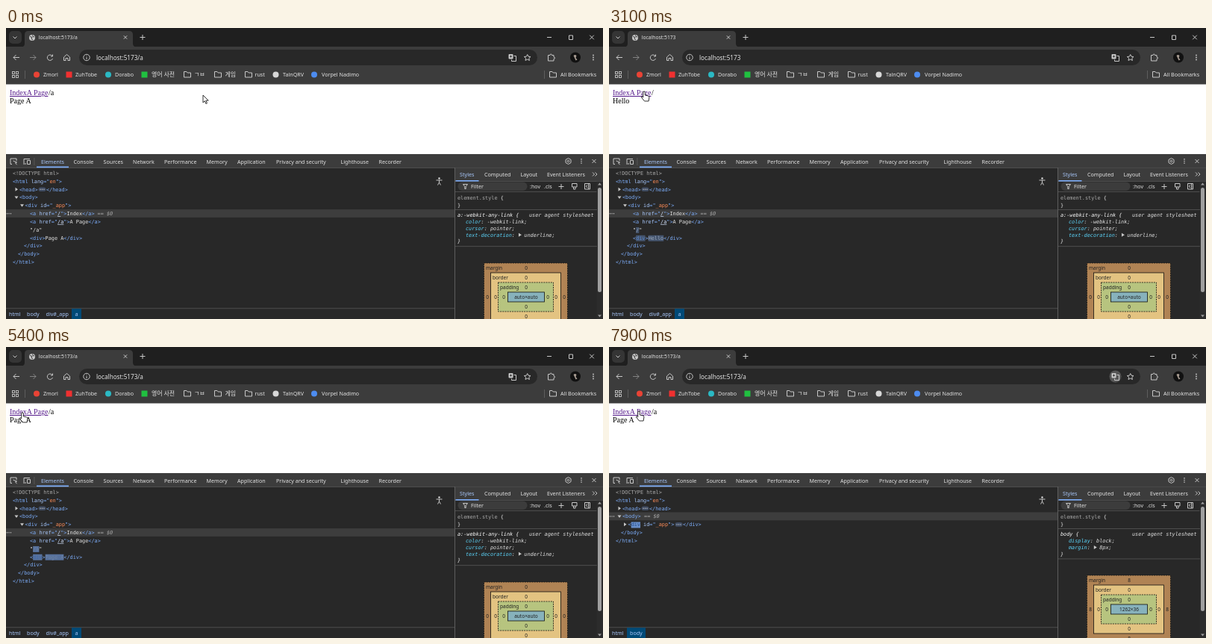
Recreate the animation shown at these times as an HTML page. Size 800x390 px, loop 8 s.

```html
<!DOCTYPE html>
<html lang="en">
<head>
<meta charset="utf-8">
<style>
html, body { margin: 0; width: 100%; height: 100%; overflow: hidden; background: #282828 }
svg { display: block; width: 800px; height: 390px }
text { white-space: pre; font: 7.15px "Noto Sans", "Open Sans", "Noto Sans CJK KR", sans-serif; fill: #e3e3e3 }
.ko { font-family: "Noto Sans CJK KR", "Noto Sans CJK", sans-serif; font-size: 8px }
.tool { font-weight: 500 }
.mono { font: 6.85px "DejaVu Sans Mono", monospace }
.it { font-style: italic }
.page { font: 10px "Liberation Serif", serif; fill: #000 }
.box { font-size: 6.5px; fill: #222; text-anchor: middle }
.tag { fill: #7cacf8 }
.name { fill: #a8c7fa }
.val { fill: #fe8d59 }
.url { fill: #d3e3fd }
.prop { fill: #5cd5fb }
.sel { fill: #fff }
.dim { fill: #ababab }
.link { text-decoration: underline }
.icon { fill: none; stroke: #c7c7c7; stroke-width: 1 }
</style>
</head>
<body>
<svg viewBox="0 0 800 390"><g id="frame"></g><g id="live"></g></svg>
<script>
const CHAR = 4.125, LOOP = 8000, RELOAD = 7700, FADE = 900;

// Moments when the route changes; it alternates between "/" and "/a".
const clicks = [700, 1050, 1500, 2000, 2500, 3300, 3650, 4000, 4700, 5000, 5600, 5900, 6300, 7100];

// Pointer tip: time, x, y
const path = [
  [0, 264, 90], [200, 264, 90], [600, 12, 86], [700, 12, 86], [950, 42, 86], [1050, 42, 86],
  [1400, 12, 86], [1500, 12, 86], [1700, 36, 86], [2000, 42, 86], [2400, 14, 86], [2500, 14, 86],
  [2800, 45, 86], [3100, 47, 85], [3300, 47, 85], [3550, 13, 86], [3650, 13, 86], [3900, 43, 86],
  [4000, 43, 86], [4400, 12, 86], [4700, 12, 86], [4900, 40, 86], [5000, 40, 86], [5400, 22, 88],
  [5600, 13, 86], [5800, 43, 86], [5900, 43, 86], [6200, 13, 86], [6300, 13, 86], [6600, 44, 86],
  [7100, 44, 86], [7900, 40, 86]
];

const esc = s => s.replace(/</g, '&lt;').replace(/>/g, '&gt;');
const rect = (x, y, w, h, fill, more = '') => `<rect x="${x}" y="${y}" width="${w}" height="${h}" fill="${fill}" ${more}/>`;
const circle = (x, y, r, fill, more = '') => `<circle cx="${x}" cy="${y}" r="${r}" fill="${fill}" ${more}/>`;
const raw = (x, y, s, cls = '', more = '') => `<text x="${x}" y="${y}" class="${cls}" ${more}>${s}</text>`;
const text = (x, y, s, cls, more) => raw(x, y, esc(s), cls, more);
const span = (cls, s) => `<tspan class="${cls}">${s}</tspan>`;
const icon = (d, more = '') => `<path class="icon" d="${d}" ${more}/>`;
const dots = (x, y, dx, dy, r = .8) => [-1, 0, 1].map(i => circle(x + i * dx, y + i * dy, r, '#c7c7c7')).join('');
const folder = x => icon(`M${x - 4.5} 58.5h3.5l1.2 1.5h4.3v6h-9z`);
const cross = (x, y, r) => icon(`M${x - r} ${y - r}l${2 * r} ${2 * r}m0 ${-2 * r}l${-2 * r} ${2 * r}`);
const mix = (a, b, p) => `rgb(${a.map((v, i) => Math.round(v + (b[i] - v) * p))})`;

// Markup with syntax colours
const code = s => s.replace(/<[^>]*>|[^<]+/g, m => m[0] == '<'
  ? span('tag', esc(m).replace(/ (\w+)="([^"]*)"/, (_, n, v) =>
      ` ${span('name', n)}="${span(n == 'href' ? 'url link' : 'val', v)}"`))
  : m);
const rowY = i => 197 + i * 10.82;
const row = (x, i, s) => raw(x, rowY(i), code(s), 'mono');
const arrow = (x, i, open) => `<path transform="translate(${x} ${rowY(i) - 2.5})" d="${open ? 'M-2.5-1.5h5L0 2z' : 'M-1.5-2.5v5L2 0z'}" fill="#c7c7c7"/>`;
const pill = (x, i) => rect(x, rowY(i) - 5.2, 10, 5.6, '#3f4b61', 'rx="2.8"') + dots(x + 5, rowY(i) - 2.4, 2.4, 0, .7);

function chrome() {
  let s = rect(0, 0, 800, 76, '#1f1f1f') + rect(4, 4, 17, 17, '#353535', 'rx="5"');
  s += '<path d="M20 25.5q5 0 5-5V9q0-5 5-5h135q5 0 5 5v11.5q0 5 5 5z" fill="#3c3c3c"/>';
  s += rect(0, 25, 800, 51, '#3c3c3c') + rect(98, 29, 614, 21, '#282828', 'rx="10.5"');
  s += icon('M9.5 11.5l2.5 2.5 2.5-2.5M179.500 12.5h7m-3.5-3.5v7M725 12.5h6M754.500 10h5v5.5h-5z');
  s += cross(160, 12.5, 2.2) + cross(785, 12.5, 2.8);
  s += circle(35, 13, 4, '#c7c7c7') + icon('M32 11.5l3 1-1 2 2 1.5M35.5 9.5l.5 2 2 .5', 'style="stroke:#3c3c3c"');
  s += icon('M18 39.5h-8m3.5-3.5l-3.5 3.5 3.5 3.5');
  s += icon('M32 39.5h8m-3.5-3.5l3.5 3.5-3.5 3.5', 'opacity=".5"');
  s += icon('M62 37.5a3.7 3.7 0 1 0 .5 3.5M62.5 35.5v2.5h-2.5M77.5 39l4-3.5 4 3.5v4.5h-2.5v-3h-3v3h-2.5z');
  s += circle(108, 39.5, 4.2, 'none', 'stroke="#c7c7c7"') + icon('M108 39v3M108 37v.8');
  s += icon('M698.7 35.5l1.3 2.7 3 .3-2.2 2 .6 3-2.7-1.5-2.7 1.5.6-3-2.2-2 3-.3z');
  s += icon('M726.5 36.5h2.5q0-1.5 1.2-1.5t1.2 1.5h2.6v2.5q1.5 0 1.5 1.2t-1.5 1.2v2.6h-7.500z');
  s += circle(763, 39.5, 7, '#111') + '<path d="M760.5 37q2-2 4 0l-1 3 2 2.5-2 1z" fill="#a89c92"/>' + dots(787, 39.5, 0, 3, .9);
  for (const x of [8.5, 13.5]) for (const y of [58.5, 63.5]) s += rect(x, y, 3, 3, 'none', 'stroke="#c7c7c7" stroke-width=".9"');
  s += rect(25, 57, 1, 11, '#5e5e5e') + rect(721, 57, 1, 11, '#5e5e5e');
  s += circle(41, 62.5, 4, '#e94335') + rect(80.5, 58.5, 8, 8, '#f03030') + circle(137, 62.5, 4, '#2bb9c4');
  s += rect(181.5, 58.5, 8, 8, '#20c040') + circle(361.5, 62.5, 4, '#d8d8d8') + circle(413, 62.5, 4, '#4d8cf0');
  s += [243, 284, 325, 733].map(folder).join('');
  s += [[50, 'Zmorl'], [93, 'ZuhTobe'], [146, 'Dorabo'], [333.5, 'rust'], [371, 'TalnQRV'], [423, 'Vorpel Nadimo'], [743, 'All Bookmarks']]
    .map(([x, l]) => text(x, 65, l)).join('');
  s += [[195, '영어 사전'], [252, 'ㄱㅂ'], [293.5, '게임']].map(([x, l]) => text(x, 65.3, l, 'ko')).join('');
  return s + rect(0, 75.5, 800, 93.5, '#fff');
}

function devtools() {
  let s = rect(0, 169, 800, 18.5, '#3c3c3c') + rect(0, 187, 800, 203, '#282828') + rect(0, 187, 800, .7, '#5e5e5e');
  s += icon('M8 182.5h-2v-7.5h8v3M9.5 178l5 2-2 .8 2 2.4') + icon('M24 181v-5.5h8M23 182h4M28.5 177.5h4v5h-4z');
  s += rect(37.5, 174, .8, 10, '#5e5e5e');
  s += [[90.5, 'Console'], [130.5, 'Sources'], [170, 'Network'], [212, 'Performance'], [268.5, 'Memory'], [310, 'Application'],
    [362, 'Privacy and security'], [448.5, 'Lighthouse'], [499.5, 'Recorder']].map(([x, l]) => text(x, 182, l, 'tool')).join('');
  s += text(47, 182, 'Elements', 'tool', 'style="fill:#a8c7fa"') + rect(41, 185.5, 43, 1.7, '#7cacf8');
  s += icon('M753.5 174.5l3.5 2v4l-3.5 2-3.5-2v-4z') + circle(753.5, 178.5, 1.3, 'none', 'stroke="#c7c7c7"');
  s += dots(771, 178.5, 0, 2.6) + cross(788, 178.5, 2.5);
  s += rect(601, 187, 1, 203, '#5e5e5e') + rect(602, 187.7, 198, 17.3, '#3c3c3c') + rect(602, 205, 198, .7, '#5e5e5e');
  s += text(608, 199, 'Styles', 'tool', 'style="fill:#a8c7fa"') + rect(602.5, 204, 31, 1.6, '#7cacf8');
  s += [[641, 'Computed'], [689.5, 'Layout'], [725, 'Event Listeners']].map(([x, l]) => text(x, 199, l, 'tool')).join('');
  s += icon('M786 193.5l2.5 2.5-2.5 2.5m3.5-5l2.5 2.5-2.5 2.5');
  s += rect(605.5, 206.5, 93, 11.5, '#3c3c3c', 'rx="5.7"') + icon('M612.5 209.5h6l-2.3 3v3h-1.4v-3z') + text(623, 215, 'Filter');
  s += text(702, 214.5, ':hov', 'tool') + text(721, 214.5, '.cls', 'tool');
  s += icon('M740.5 212.5h7m-3.5-3.5v7M758.5 208.5h6.5v4.5h-6.5zM760.5 213v3h2.5v-3M775.5 208.5h7v7.5h-7zM780.5 208.5v7.5M779 210.5l-2 1.7 2 1.7');
  s += rect(602, 219, 190, .7, '#5e5e5e') + rect(791.5, 205.7, 8.5, 184.3, '#2c2c2c') + rect(793, 214, 5, 140, '#9f9f9f', 'rx="2.5"');
  s += '<path d="M793 210.5h5l-2.5-3zM793 384.5h5l-2.5 3z" fill="#9f9f9f"/>';
  s += text(605, 229.5, 'element.style', 'mono dim') + text(605 + 14 * CHAR, 229.5, '{', 'mono') + text(605, 239.5, '}', 'mono');
  s += rect(602, 243.3, 190, .7, '#5e5e5e');
  s += circle(580.5, 201.5, 1.2, '#ddd') + icon('M576.5 204h8M580.5 204v3l-2 3.5M580.5 207l2 3.5');
  return s;
}

function rules(fresh) {
  const [sel, list] = fresh
    ? ['body', [['display', 'block'], ['margin', '  8px', 1]]]
    : ['a:-webkit-any-link', [['color', '-webkit-link'], ['cursor', 'pointer'], ['text-decoration', '  underline', 1]]];
  let s = text(605, 253, sel + ' {', 'mono it sel') + text(701, 253, 'user agent stylesheet', 'mono it');
  list.forEach(([n, v, more], i) => {
    const y = 262 + i * 8.8;
    s += raw(616, y, `${span('prop', n)}: ${v};`, 'mono it');
    if (more) s += `<path d="M${616 + (n.length + 2.2) * CHAR} ${y - 4.8}v5l4-2.5z" fill="#c7c7c7"/>`;
  });
  const end = 262 + list.length * 8.8;
  return s + text(605, end, '}', 'mono it') + rect(602, end + 4, 190, .7, '#5e5e5e');
}

function boxModel(y, margin, size) {
  const layer = (x, top, w, h, fill, dash) =>
    rect(x + .5, y + top, w, h, fill, `stroke="#111" stroke-width=".8" ${dash ? 'stroke-dasharray="2 1.2"' : ''}`);
  let s = layer(640, 0, 112, 91, '#b08354', 1) + layer(649, 13, 94, 65, '#e3c381') + layer(659, 26, 74, 39, '#b7c47f', 1) + layer(672, 39, 49, 13, '#87b2bc');
  [['margin', 643, margin], ['border', 652, 0], ['padding', 662, 0]].forEach(([name, x, v], i) => {
    const top = y + 9 + i * 13;
    s += text(x, top, name, 'box', 'style="text-anchor:start"') + text(697, top, '' + v, 'box');
    s += text(645 + i * 11, y + 48, '' + v, 'box') + text(748 - i * 11, y + 48, '' + v, 'box');
    s += text(697, y + 87 - i * 13, '' + v, 'box');
  });
  return s + text(697, y + 48, size, 'box');
}

function flash(x, i, s, base, p) {
  const ink = mix(base, [12, 52, 112], p), y = rowY(i);
  return rect(x, y - 5.8, s.length * CHAR, 8, mix([40, 40, 40], [124, 172, 248], p)) + text(x, y, s, 'mono', `style="fill:${ink}"`);
}

function tree(t, route, age) {
  const fresh = t >= RELOAD, pick = fresh ? 3 : 5;
  const p = Math.max(0, 1 - age / FADE), blue = [124, 172, 248], white = [227, 227, 227];
  let s = rect(0, rowY(pick) - 8, 601, 10.8, '#3d3d3d') + dots(4, rowY(pick) - 2.4, 2.5, 0, .7);
  s += text(9, rowY(0), '<!DOCTYPE html>', 'mono dim') + row(9, 1, '<html lang="en">');
  s += arrow(14, 2) + row(18, 2, '<head>') + pill(43.5, 2) + row(54, 2, '</head>') + arrow(14, 3, 1) + row(18, 3, '<body>');
  const mark = x => raw(x, rowY(pick), ' == <tspan class="it">$0</tspan>', 'mono dim');
  if (fresh) {
    s += mark(43) + arrow(21.5, 4) + row(25.5, 4, '<div id="_app">') + pill(88.5, 4) + row(99, 4, '</div>');
    if (p) s += flash(25.5 + CHAR, 4, 'div', blue, p);
    return s + row(16, 5, '</body>') + row(9, 6, '</html>');
  }
  const body = route == '/' ? 'Hello' : 'Page A';
  s += arrow(21.5, 4, 1) + row(25.5, 4, '<div id="_app">') + row(32, 5, '<a href="/">Index</a>') + mark(118.5);
  s += row(32, 6, '<a href="/a">A Page</a>') + row(32, 7, `"${route}"`) + row(32, 8, `<div>${body}</div>`);
  if (p) s += flash(32 + CHAR, 7, route, white, p) + flash(32 + CHAR, 8, 'div', blue, p) + flash(32 + 5 * CHAR, 8, body, white, p);
  return s + row(24, 9, '</div>') + row(16, 10, '</body>') + row(9, 11, '</html>');
}

function crumbs(fresh) {
  let s = rect(0, 375.5, 601, .7, '#5e5e5e') + (fresh ? rect(24, 376.2, 25, 14, '#004a77') : rect(88, 376.2, 13, 14, '#004a77'));
  const list = [[4, 'html'], [28, 'body'], [53.5, 'div#_app'], [92.5, 'a']];
  return s + list.slice(0, fresh ? 2 : 4).map(([x, l]) => text(x, 385.5, l, 'tool', 'style="fill:#a8c7fa"')).join('');
}

function page(route, pressed) {
  const link = (x, l, on) => text(x, 90, l, 'page link', `style="fill:${on ? '#f00' : '#551a8b'}"`);
  return link(5, 'Index', pressed == '/') + link(27.8, 'A Page', pressed == '/a') + text(56.9, 90, route, 'page')
    + text(5, 101, route == '/' ? 'Hello' : 'Page A', 'page');
}

function pointer(t) {
  const i = path.findIndex(k => k[0] > t);
  const b = path.at(i), a = i > 0 ? path[i - 1] : b;
  const f = a == b ? 0 : (t - a[0]) / (b[0] - a[0]);
  const x = a[1] + (b[1] - a[1]) * f, y = a[2] + (b[2] - a[2]) * f;
  const d = x < 57
    ? 'M-1.3 8V1.2a1.3 1.3 0 0 1 2.6 0V5l4.3 1q1.4.4 1.3 2l-.8 5h-5.6l-4-5q-.4-1.4.8-1.2z'
    : 'M0 0v10l2.3-2.2 1.6 3.7 1.6-.7-1.6-3.6h3.3z';
  return `<path transform="translate(${x} ${y})" d="${d}" fill="#fff" stroke="#000" stroke-width=".8"/>`;
}

function scene(t) {
  const done = clicks.filter(c => c <= t), fresh = t >= RELOAD;
  const route = done.length % 2 ? '/' : '/a';
  const since = fresh ? RELOAD : done.length ? done.at(-1) : -FADE;
  const next = clicks[done.length];
  const pressed = next - t <= 100 ? (route == '/' ? '/a' : '/') : '';
  const url = 'localhost:5173' + (route == '/' ? '' : route);
  let s = text(43.7, 15.3, url, '', 'style="font-size:6.75px"') + text(121, 42.5, url, '', 'style="font-size:8.17px"');
  if (fresh) s += circle(678.5, 39.5, 8, '#565656');
  s += rect(673.5, 35, 6, 6.5, '#c7c7c7', 'rx="1"') + icon('M680.5 37.5h3v7h-6v-2') + icon('M675 38.2h3M676.5 36.5v3', 'style="stroke:#333"');
  s += page(route, pressed) + tree(t, route, t - since) + crumbs(fresh) + rules(fresh);
  return s + (fresh ? boxModel(306, 8, '1262×36') : boxModel(315, 0, 'auto×auto')) + pointer(t);
}

const live = document.getElementById('live');
document.getElementById('frame').innerHTML = chrome() + devtools();
const start = performance.now();
let shown = -1;
function draw() {
  const t = Math.floor((performance.now() - start) % LOOP / 100) * 100;
  if (t != shown) live.innerHTML = scene(shown = t);
  requestAnimationFrame(draw);
}
draw();
</script>
</body>
</html>
```
